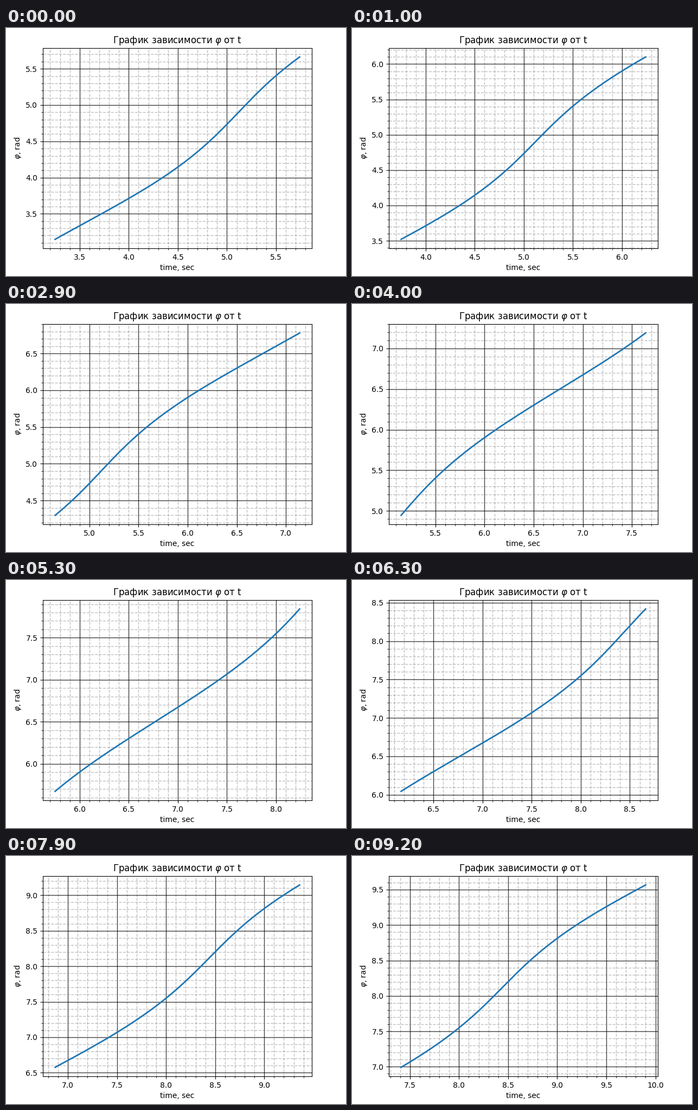
Recreate the animation shown at these times as a matplotlib script. Size 627 by 457 pixels, loop 9300 ms.

```python
import matplotlib.pyplot as plt
import numpy as np
from matplotlib.animation import FuncAnimation

WIDTH, HEIGHT, DPI = 627, 457, 100
FRAMES, INTERVAL = 93, 100
STEP, WINDOW, HOP = 0.01, 250, 0.02


def time_at(phi):
    """Time at which the rotation reaches angle phi: a steady turn with a wobble."""
    return (0.0748 + 1.03 * phi
            + 0.1605 * np.sin(2 * phi - 0.45)
            + 0.0123 * np.sin(phi - 0.306)
            + 0.0043 * np.cos(3 * phi + 0.671))


PHI = np.linspace(2.5, 10.5, 4001)
TIME = time_at(PHI)


def angle(t):
    return np.interp(t, TIME, PHI)


def window_start(frame):
    """Start of the visible span: whole hops, slowing down slightly."""
    return 3.25 + HOP * round(0.4 + 2.4636 * frame - 0.0023 * frame ** 2)


plt.rcParams["font.family"] = "DejaVu Sans"
fig = plt.figure(figsize=(WIDTH / DPI, HEIGHT / DPI), dpi=DPI)
ax = fig.add_axes([68 / WIDTH, 50.8 / HEIGHT, 496 / WIDTH, 369.6 / HEIGHT])
ax.set_title(r"График зависимости $\varphi$ от t")
ax.set_xlabel("time, sec")
ax.set_ylabel(r"$\varphi$, rad")
ax.minorticks_on()
ax.grid(which="major", color="black", linewidth=1, alpha=0.75)
ax.grid(which="minor", color="gray", linewidth=1, linestyle="--", alpha=0.5)
line, = ax.plot([], [], color="tab:blue", linewidth=2)


def update(frame):
    t = window_start(frame) + STEP * np.arange(WINDOW)
    line.set_data(t, angle(t))
    ax.relim()
    ax.autoscale_view()
    return line,


anim = FuncAnimation(fig, update, frames=FRAMES, interval=INTERVAL,
                     repeat=True, repeat_delay=0)
plt.show()
```
